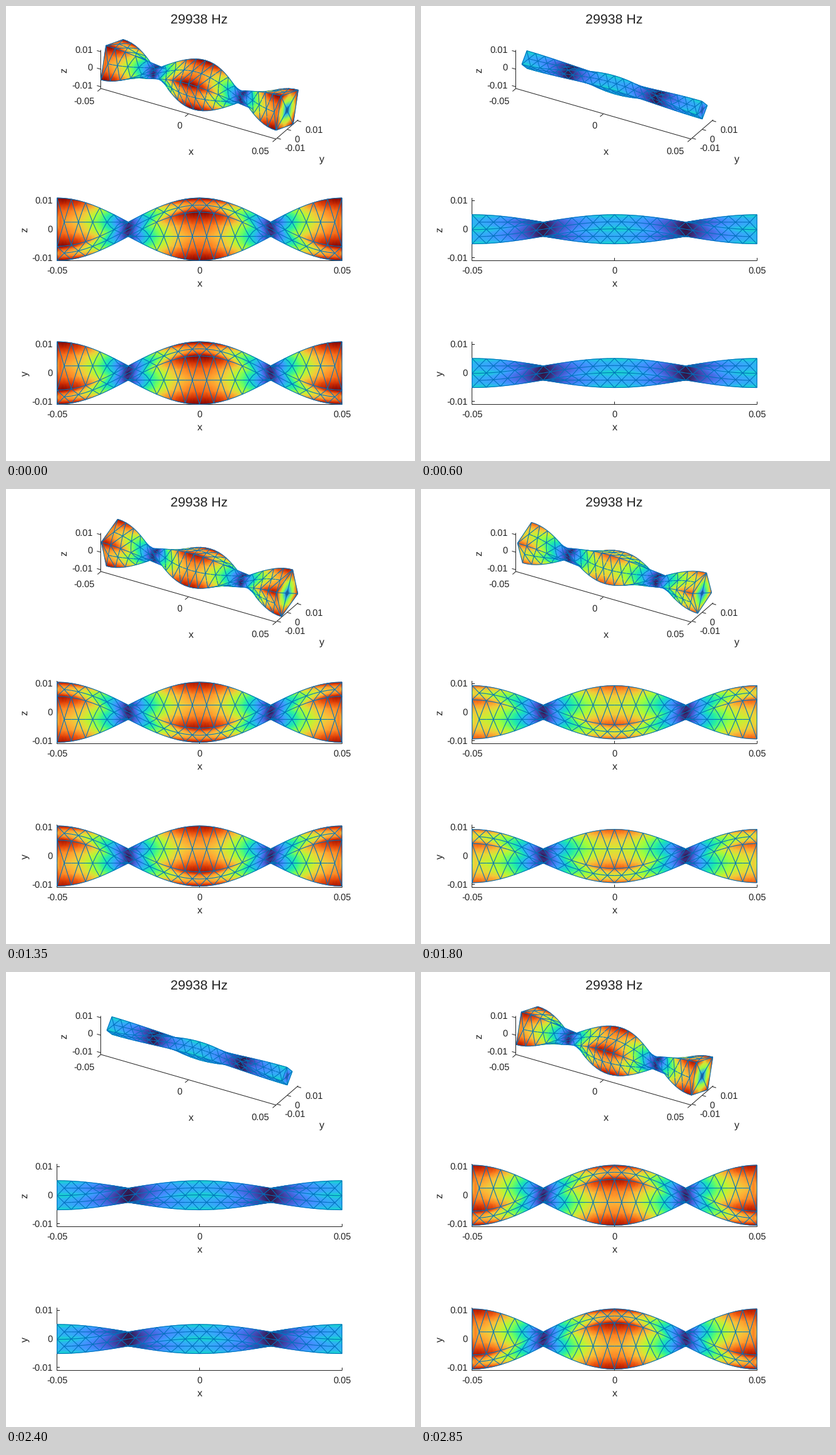
A matplotlib script that plays this animation: 654 by 728 pixels, repeating every 3000 ms.

```python
import numpy as np
import matplotlib.pyplot as plt
from matplotlib.animation import FuncAnimation
from matplotlib.collections import LineCollection
from matplotlib.tri import Triangulation

W, H, DPI = 654, 728, 64
FRAMES, INTERVAL = 20, 150
PT = 72 / DPI                 # points per pixel
INK = "#222222"
EDGE = (0, 114 / 255, 189 / 255)

LENGTH, HALF = 0.1, 0.0025    # beam length, half side of its square section
LIMIT = 0.011
TWIST = 3.4
CELLS = 20

plt.rcParams["font.family"] = "Liberation Sans"
plt.rcParams["text.hinting"] = "no_hinting"
fig = plt.figure(figsize=(W / DPI, H / DPI), dpi=DPI, facecolor="white")
ax = fig.add_axes([0, 0, 1, 1])
ax.set_xlim(0, W)
ax.set_ylim(H, 0)
ax.axis("off")


def build_beam():
    """Surface triangles of the beam, wound outward."""
    ring = HALF * np.array([(-1, -1), (-1, 1), (1, 1), (1, -1)])
    xs = np.linspace(-LENGTH / 2, LENGTH / 2, CELLS + 1)
    points, tris = [], []

    def add(x, yz):
        points.append((x, *yz))
        return len(points) - 1

    corner = [[add(x, yz) for x in xs] for yz in ring]
    for j in range(4):
        a, b = corner[j], corner[(j + 1) % 4]
        centre = (ring[j] + ring[(j + 1) % 4]) / 2
        m = [add(x, centre) for x in (xs[:-1] + xs[1:]) / 2]
        for i in range(CELLS):
            tris += [(a[i], a[i + 1], m[i]), (b[i + 1], b[i], m[i])]
        for i in range(CELLS - 1):
            tris += [(m[i], a[i + 1], m[i + 1]), (m[i], m[i + 1], b[i + 1])]
        tris += [(a[0], m[0], b[0]), (b[-1], m[-1], a[-1])]
    left, right = add(xs[0], (0, 0)), add(xs[-1], (0, 0))
    for j in range(4):
        a, b = corner[j], corner[(j + 1) % 4]
        tris += [(left, a[0], b[0]), (right, b[-1], a[-1])]
    return np.array(points), np.array(tris)


def split(tris, count):
    """Cut every triangle in four; returns the new ones and the halved pairs."""
    sides = np.sort(np.vstack([tris[:, [0, 1]], tris[:, [1, 2]], tris[:, [2, 0]]]))
    pairs, where = np.unique(sides, axis=0, return_inverse=True)
    ab, bc, ca = count + where.reshape(3, -1)
    a, b, c = tris.T
    quarters = [(a, ab, ca), (b, bc, ab), (c, ca, bc), (ab, bc, ca)]
    return np.vstack([np.column_stack(q) for q in quarters]), pairs


def with_midpoints(values, pairs):
    return np.concatenate([values, values[pairs].mean(axis=1)])


points, coarse = build_beam()
tris, pairs = split(coarse, len(points))
points = with_midpoints(points, pairs)
fine, fine_pairs = split(tris, len(points))
has_edges = np.arange(len(tris)) < 3 * len(coarse)   # the inner quarter has none
mid_x = points[tris, 0].mean(axis=1)
slab = np.clip(((mid_x / LENGTH + 0.5) * CELLS).astype(int), 0, CELLS - 1)
radius = np.hypot(points[:, 1], points[:, 2]) / (HALF * np.sqrt(2))


class View:
    def __init__(self, origin, right, up, scale, sliced=False):
        self.origin = np.array(origin)
        self.matrix = scale * np.column_stack([right, -np.array(up)])
        self.sliced = sliced

    def project(self, p):
        return self.origin + np.asarray(p) @ self.matrix


az = el = np.radians(30)
solid = View((309.5, 126.2),
             (np.cos(az), np.sin(az), 0),
             (-np.sin(az) * np.sin(el), np.cos(az) * np.sin(el), np.cos(el)),
             3233, sliced=True)
side = View((309.4, 357.2), (1, 0, 0), (0, 0, 1), 4555)
top = View((309.4, 587.2), (1, 0, 0), (0, 1, 0), 4555)


def line(p, q):
    """Axis line; upright and level ones sit on pixel centres."""
    ends = np.array([p, q], dtype=float)
    for k in range(2):
        if abs(ends[0, k] - ends[1, k]) < 1e-6:
            ends[:, k] = np.floor(ends[0, k]) + 0.5
    ax.plot(*ends.T, color=INK, lw=PT, zorder=0.5,
            solid_capstyle="butt", snap=False)


def label(x, y, text, size=14.67, ha="center", rotation=0):
    ax.text(x, y, text, fontsize=size * PT, color=INK, ha=ha,
            va="center", rotation=rotation)


def flat_axes(cy, name):
    x0, x1, base = 81.5, 537.3, cy + 50.5
    line((x0, cy - 50), (x0, base))
    line((x0, base), (x1, base))
    for i, text in enumerate(("-0.05", "0", "0.05")):
        x = x0 + i * (x1 - x0) / 2
        line((x, base), (x, base - 4.5))
        label(x + 0.3, cy + 67.3, text)
    for i, text in enumerate(("0.01", "0", "-0.01")):
        y = cy + (i - 1) * 45.55
        line((x0, y), (x0 + 4.5, y))
        label(75, cy + 1 + (i - 1) * 46, text, ha="right")
    label(310, cy + 88.3, "x", 16.1)
    label(30.5, cy + 0.8, name, 16.1, rotation=90)


def solid_axes():
    half = LENGTH / 2
    back = (-half, -LIMIT, LIMIT)
    left = (-half, -LIMIT, -LIMIT)
    front = (half, -LIMIT, -LIMIT)
    right = (half, LIMIT, -LIMIT)
    for p, q in ((back, left), (left, front), (front, right)):
        line(solid.project(p), solid.project(q))

    def tick(p, axis, length):
        start = solid.project(p)
        step = solid.matrix[axis]
        line(start, start + length * step / np.hypot(*step))

    for x in (-half, 0, half):
        tick((x, -LIMIT, -LIMIT), 1, -7)
    for v in (-0.01, 0, 0.01):
        tick((half, v, -LIMIT), 0, 6.5)
        tick((-half, -LIMIT, v), 0, -6.5)

    for y, text in ((71, "0.01"), (99, "0"), (127.5, "-0.01")):
        label(138.5, y, text, ha="right")
    for x, y, text in ((125, 152.5, "-0.05"), (277, 192, "0"), (407, 233, "0.05"),
                       (492.5, 199, "0.01"), (465, 213.5, "0"), (462, 227.5, "-0.01")):
        label(x, y, text)
    label(296, 233.5, "x", 16.1)
    label(505, 246, "y", 16.1)
    label(93, 103, "z", 16.1, rotation=90)


drawn = []


def draw_beam(view, shape, value):
    nodes = view.project(shape)
    a, b, c = (nodes[tris[:, k]] for k in range(3))
    u, v = b - a, c - a
    facing = u[:, 0] * v[:, 1] - u[:, 1] * v[:, 0] < 0
    fine_nodes = with_midpoints(nodes, fine_pairs)
    fine_value = with_midpoints(value, fine_pairs)

    # Slices across the beam, farthest first, give the right overlap.
    slices = [slab == k for k in range(CELLS)] if view.sliced else [slab >= 0]
    for part in slices:
        shown = facing & part
        if not shown.any():
            continue
        mesh = Triangulation(*fine_nodes.T, fine[np.tile(shown, 4)])
        drawn.append(ax.tripcolor(mesh, fine_value, shading="gouraud",
                                  cmap="turbo", vmin=0, vmax=1, zorder=1))
        t = tris[shown & has_edges]
        ends = np.unique(np.sort(np.vstack([t[:, [0, 1]], t[:, [0, 2]]])), axis=0)
        edges = LineCollection(nodes[ends], colors=[EDGE], linewidths=1.1 * PT,
                               zorder=1, snap=False)
        drawn.append(ax.add_collection(edges, autolim=False))


def update(frame):
    while drawn:
        drawn.pop().remove()
    x, y, z = points.T
    phase = -np.cos(2 * np.pi * x / LENGTH) * np.cos(2 * np.pi * frame / FRAMES)
    angle = TWIST * phase
    shape = np.column_stack([x, y - angle * z, z + angle * y])
    value = np.abs(phase) * radius
    for view in (solid, side, top):
        draw_beam(view, shape, value)
    return drawn


label(309, 22.3, "29938 Hz", 21.33)
solid_axes()
flat_axes(357, "z")
flat_axes(587, "y")

anim = FuncAnimation(fig, update, frames=FRAMES, interval=INTERVAL,
                     repeat=True, repeat_delay=0, blit=False)
plt.show()
```
